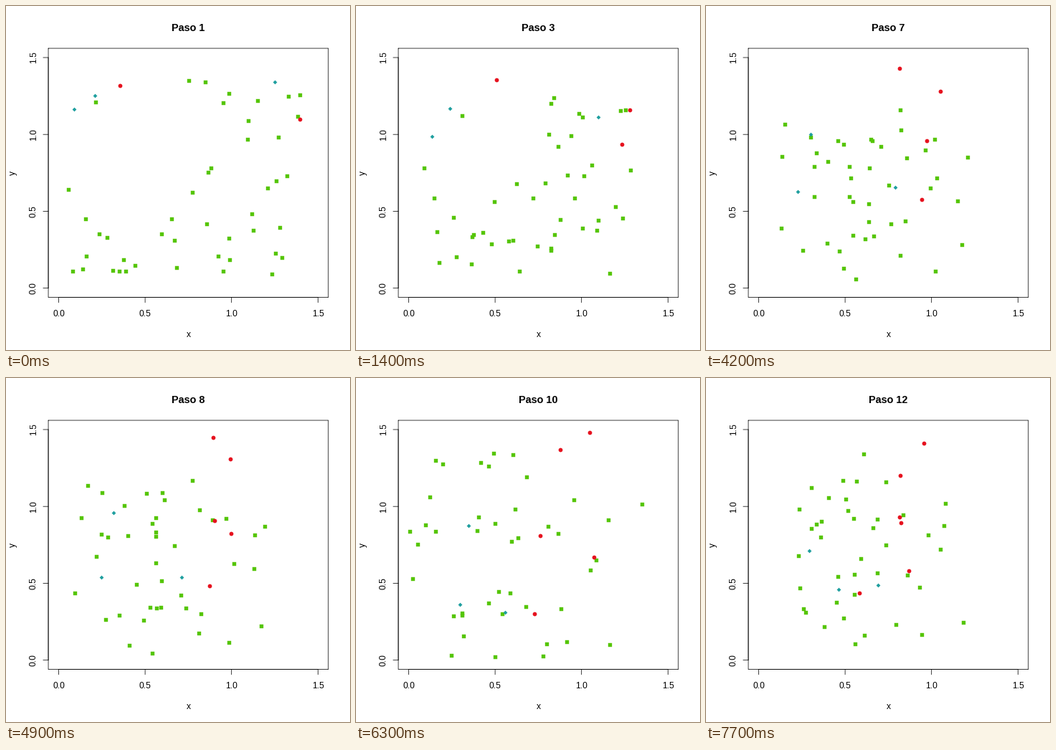
Write a matplotlib script that moves like this. It is 480 px wide and 480 px high and loops after 8000 ms.

```python
import matplotlib.pyplot as plt
import numpy as np
from matplotlib.animation import FuncAnimation

plt.rcParams["font.family"] = ["Liberation Sans", "DejaVu Sans"]

SIZE, DPI = 480, 80
PX = 72 / DPI                      # points per pixel
GREEN, RED, TEAL = "#55c505", "#e6121f", "#1f9f9f"
LEFT, RIGHT, TOP, BOTTOM = 59.04, 449.76, 59.04, 406.56
HEALTHY = 41
TURN_STEP, LEG, LAST_STEP = 10, 9, 12

# Step of infection, then the points passed at steps 1, 10 and 12
SICK = [
    (1, (158.5, 110.5), (325.7, 75.7), (304, 91)),
    (1, (410, 158), (285.3, 100), (271, 135.5)),
    (2, (406.5, 153.7), (248.5, 328.5), (213.5, 299.5)),
    (4, (410, 123.8), (256.5, 220), (269.5, 193.5)),
    (8, (254.7, 103.7), (331.5, 249.5), (282.7, 269)),
    (12, (278, 105.5), (268.3, 206.7), (272, 201.5)),
]
IMMUNE = [
    ((94.5, 144), (144.5, 316), (185, 295)),
    ((124, 125.3), (157, 206), (143.7, 241.3)),
    ((374.7, 106), (208, 326.7), (239.5, 288.7)),
]


def wanderers(n, rng):
    """Random paths: start around a gap, gather to the left, then drift off."""
    start = rng.uniform((86, 103), (410, 385), (10 * n, 2))
    gap = (start - (185, 215)) / (85, 95)
    start = start[(gap ** 2).sum(axis=1) > 1][:n]
    turn = np.column_stack([74 + 361 * rng.beta(1.2, 2.4, n), rng.uniform(105, 394, n)])
    goal = rng.uniform((74, 72), (435, 394), (n, 2))
    end = turn + (goal - turn) * (LAST_STEP - TURN_STEP) / LEG
    return np.stack([start, turn, end], axis=1)


def positions(paths, step):
    start, turn, end = paths[:, 0], paths[:, 1], paths[:, 2]
    if step <= TURN_STEP:
        return start + (turn - start) * (step - 1) / LEG
    return turn + (end - turn) * (step - TURN_STEP) / (LAST_STEP - TURN_STEP)


ill_from = np.array([row[0] for row in SICK])
sick_paths = np.array([row[1:] for row in SICK])
immune_paths = np.array(IMMUNE)
healthy_paths = wanderers(HEALTHY, np.random.default_rng(12))

fig = plt.figure(figsize=(SIZE / DPI, SIZE / DPI), dpi=DPI, facecolor="white")
ax = fig.add_axes([0, 0, 1, 1])
ax.set_xlim(0, SIZE)
ax.set_ylim(SIZE, 0)
ax.axis("off")


def line(xs, ys):
    ax.plot(xs, ys, color="black", lw=0.75 * PX, snap=False,
            solid_capstyle="round", solid_joinstyle="round")


def label(x, y, text, size=12, **kw):
    return ax.text(x, y, text, fontsize=size * PX, color="black", ha="center",
                   va="baseline", rotation_mode="anchor", **kw)


def dots(marker, size, color):
    return ax.scatter([], [], s=(size * PX) ** 2, marker=marker, color=color,
                      linewidths=0, snap=False, zorder=3)


def to_px(v):
    return 73.5 + 241.2 * v, 393.7 - 214.5 * v


line([LEFT, RIGHT, RIGHT, LEFT, LEFT], [TOP, TOP, BOTTOM, BOTTOM, TOP])
(x0, y0), (x1, y1) = to_px(0), to_px(1.5)
line([x0, x1], [BOTTOM, BOTTOM])
line([LEFT, LEFT], [y0, y1])
for v in (0, 0.5, 1, 1.5):
    x, y = to_px(v)
    line([x, x], [BOTTOM, BOTTOM + 7.2])
    line([LEFT, LEFT - 7.2], [y, y])
    label(x, 432.7, f"{v:.1f}")
    label(41.8, y, f"{v:.1f}", rotation=90)
label(254.4, 461.5, "x")
label(13, 232.8, "y", rotation=90)
title = label(254.4, 35, "", 14.4, weight="bold")

healthy = dots("s", 5.4, GREEN)
ill = dots("o", 5.8, RED)
immune = dots("D", 5.8 / 2 ** 0.5, TEAL)


def update(frame):
    step = frame // 7 + 1
    sick = ill_from <= step
    exposed = positions(sick_paths, step)
    healthy.set_offsets(np.vstack([positions(healthy_paths, step), exposed[~sick]]))
    ill.set_offsets(exposed[sick])
    immune.set_offsets(positions(immune_paths, step))
    title.set_text(f"Paso {step}")
    return healthy, ill, immune, title


anim = FuncAnimation(fig, update, frames=80, interval=100, repeat=True, repeat_delay=0)
plt.show()
```
